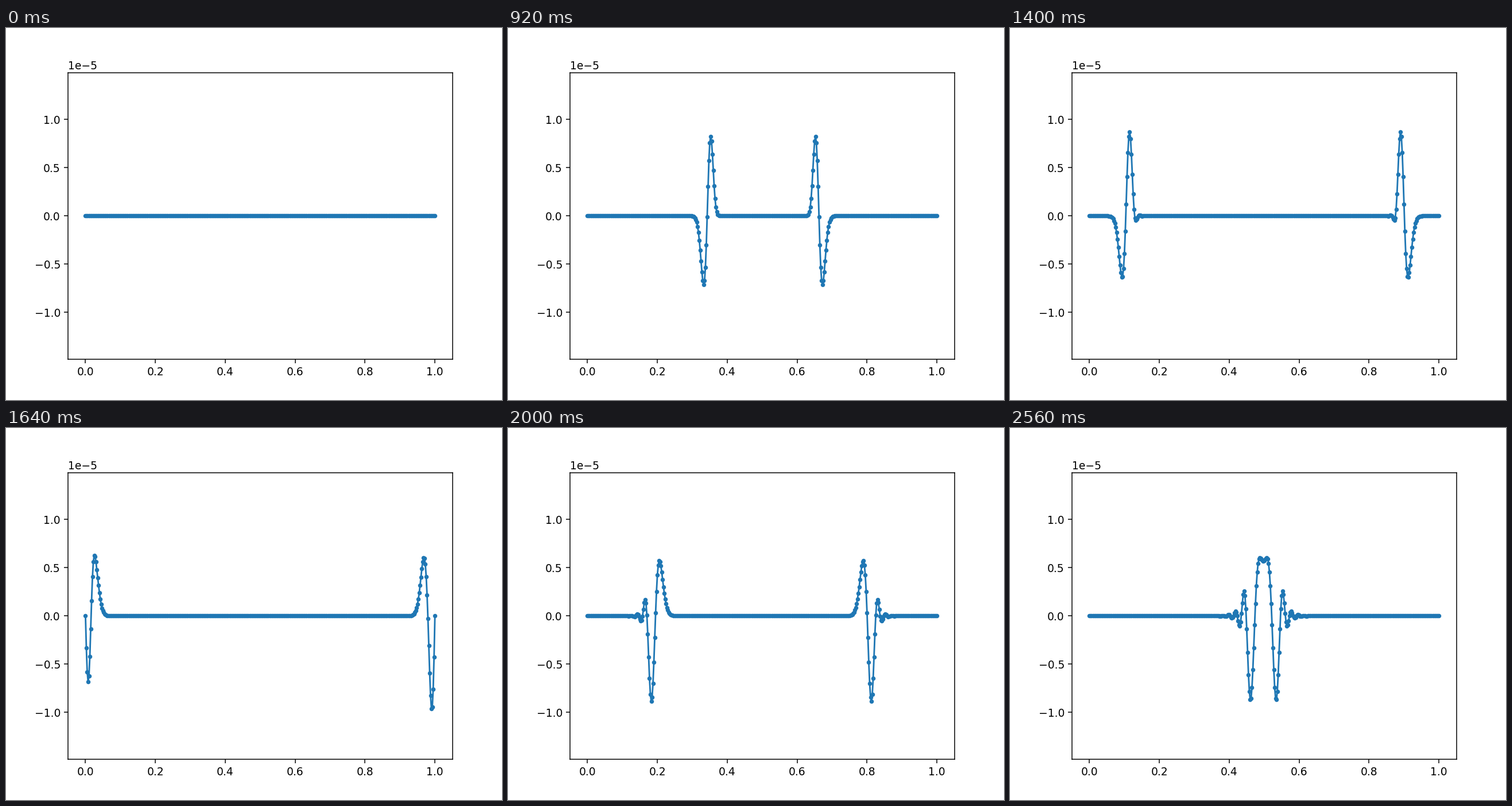
Animation, 864 px wide and 648 px high, one loop 2600 ms. Source, as a matplotlib script:

```python
import numpy as np
import matplotlib.pyplot as plt
from matplotlib.animation import FuncAnimation

# 1D wave equation, fixed ends, one point source
NX = 401
SRC = 201
C = 1.0
DX = 1 / (NX - 1)
DT = 0.001
T0, SIGMA = 0.3, 0.01
FRAMES, STRIDE = 65, 20


def wavelet(t):
    q = ((t - T0) / SIGMA) ** 2
    return (1 - q) * np.exp(-q / 2)


def simulate():
    """Second-order finite differences, one snapshot every STRIDE steps."""
    old, now = np.zeros(NX), np.zeros(NX)
    courant2 = (C * DT / DX) ** 2
    shots = []
    for step in range(FRAMES * STRIDE):
        new = np.zeros(NX)
        lap = now[2:] - 2 * now[1:-1] + now[:-2]
        new[1:-1] = 2 * now[1:-1] - old[1:-1] + courant2 * lap
        new[SRC] += DT ** 2 * wavelet(step * DT)
        old, now = now, new
        if step % STRIDE == 0:
            shots.append(now)
    return shots


shots = simulate()

fig, ax = plt.subplots(figsize=(6.4, 4.8), dpi=135)
line, = ax.plot(np.linspace(0, 1, NX), shots[0], marker=".")
ax.set_xlim(-0.05, 1.05)
ax.set_ylim(-1.485e-5, 1.485e-5)


def draw(frame):
    line.set_ydata(shots[frame])
    return line,


anim = FuncAnimation(fig, draw, frames=FRAMES, interval=40, repeat=True,
                     repeat_delay=0, blit=False)
plt.show()
```
